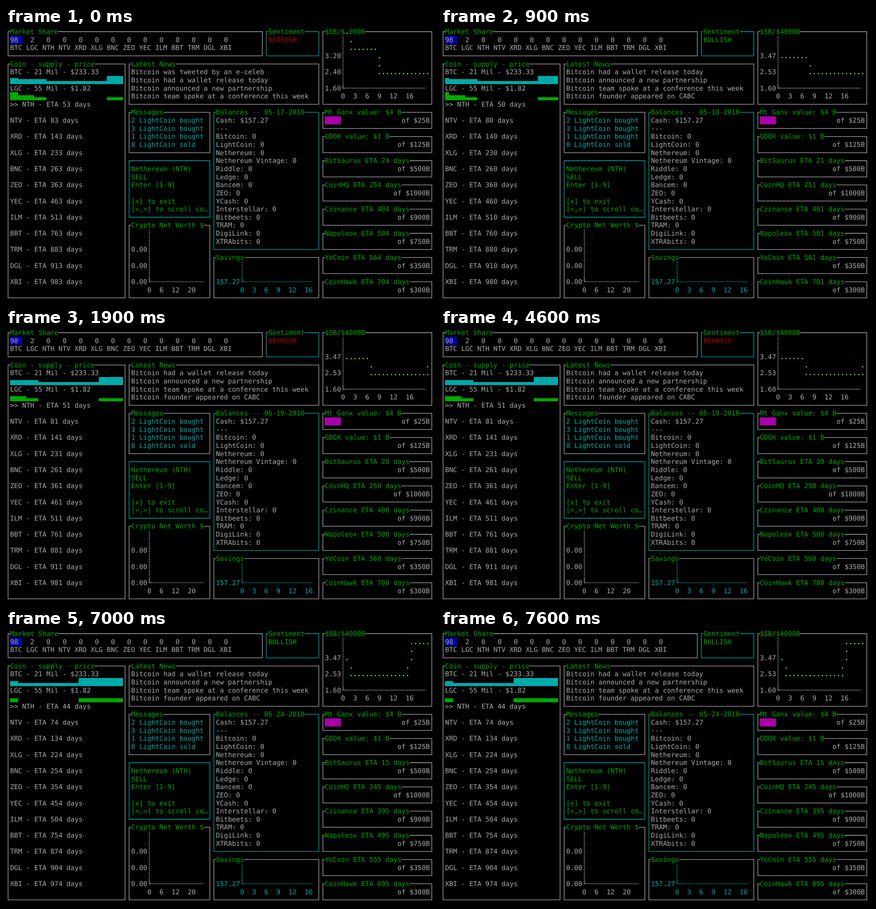
Recreate the animation shown at these times as an HTML page. Size 938 by 597 pixels, loop 8 s.

```html
<!DOCTYPE html>
<html lang="en">
<head>
<meta charset="utf-8">
<title>Coin terminal</title>
<style>
html, body { margin: 0; width: 100%; height: 100%; overflow: hidden; background: #000; }
svg { display: block; width: 938px; height: 597px; }
text {
  font: 14.656px "DejaVu Sans Mono", monospace;
  white-space: pre;
  text-rendering: geometricPrecision;
}
path { fill: none; stroke-width: 1.3; }
</style>
</head>
<body>
<svg id="screen" viewBox="0 0 938 597"></svg>
<script>
const CW = 8.824, RH = 17.64;
const GRAY = '#aaaaaa', GREEN = '#00aa00', CYAN = '#00aaaa', RED = '#aa0000',
  BLUE = '#0000aa', MAGENTA = '#aa00aa', LIME = '#55ff55';

const STEPS = [
  { at: 0, shift: 0, coinEta: 53, marketEta: 24, mood: 'BEARISH-' },
  { at: 900, shift: 1, coinEta: 50, marketEta: 21, mood: 'BULLISH' },
  { at: 1900, shift: 2, coinEta: 51, marketEta: 20, mood: 'BEARISH' },
  { at: 6400, shift: 6, coinEta: 47, marketEta: 16, mood: 'BULLISH' },
  { at: 7000, shift: 7, coinEta: 44, marketEta: 15, mood: 'BULLISH' }
];
const LOOP = 8000;

const COINS = 'BTC LGC NTH NTV XRD XLG BNC ZEO YEC ILM BBT TRM DGL XBI'.split(' ');
const COIN_DELAY = [0, 30, 90, 180, 210, 310, 410, 460, 710, 830, 860, 930];
const NEWS = [
  'Bitcoin was tweeted by an e-celeb',
  'Bitcoin had a wallet release today',
  'Bitcoin announced a new partnership',
  'Bitcoin team spoke at a conference this week',
  'Bitcoin founder appeared on CABC'
];
const MESSAGES = ['2 LightCoin bought', '3 LightCoin bought', '1 LightCoin bought', '8 LightCoin sold'];
const ACTIONS = ['Nethereum (NTH)', 'SELL', 'Enter [1-9]', '', '[x] to exit', '[<,>] to scroll co…'];
const HOLDINGS = ['Bitcoin', 'LightCoin', 'Nethereum', 'Nethereum Vintage', 'Riddle', 'Ledge', 'Bancem',
  'ZEO', 'YCash', 'Interstellar', 'Bitbeets', 'TRAM', 'DigiLink', 'XTRAbits'];
// name, value label or extra days, capacity
const MARKETS = [
  ['Mt Ganx', 'value: $4 B', '$25B'], ['GDOX', 'value: $1 B', '$125B'],
  ['BitSaurus', 0, '$500B'], ['CoinHQ', 230, '$1000B'], ['Czinance', 380, '$900B'],
  ['Napoleox', 480, '$750B'], ['YoCoin', 540, '$350B'], ['CoinHawk', 680, '$300B']
];

const left = c => 0.1 + c * CW;
const midX = c => left(c + 0.5);
const top_ = r => -0.8 + r * RH;
const midY = r => top_(r + 0.5);
const esc = s => s.replace(/&/g, '&amp;').replace(/</g, '&lt;').replace(/>/g, '&gt;');

const text = (c, r, s, color = GRAY, extra = '') =>
  `<text x="${left(c).toFixed(2)}" y="${(midY(r) + 5.05).toFixed(2)}" fill="${color}" ${extra}>${esc(s)}</text>`;

const lines = (c, r, list, color) => list.map((s, i) => text(c, r + i, s, color)).join('');

const fill = (c, r, w, color) =>
  `<rect x="${left(c)}" y="${top_(r)}" width="${w * CW}" height="${RH}" fill="${color}"/>`;

function box(c0, r0, c1, r1, title = '', color = GRAY) {
  const x0 = midX(c0), y0 = midY(r0), x1 = midX(c1), y1 = midY(r1);
  const a = left(c0 + 1), b = left(c0 + 1 + title.length);
  return `<path d="M${b} ${y0}H${x1}V${y1}H${x0}V${y0}H${a}" stroke="${color}"/>` +
    text(c0 + 1, r0, title, GREEN);
}

function axes(c, r0, r1, cEnd, color) {
  const x = midX(c), y = midY(r1);
  return `<path d="M${x} ${top_(r0) + 0.7}V${top_(r1)}" stroke="${color}" stroke-dasharray="2.9 1.51"/>` +
    `<path d="M${x} ${top_(r1)}V${y}H${left(c + 1)}" stroke="${color}"/>` +
    `<path d="M${left(c + 1) + 0.4} ${y}H${left(cEnd + 1)}" stroke="${color}" stroke-dasharray="1.4 .806"/>`;
}

const ticks = (c, r, list, color) => list.map(([dc, s]) => text(c + dc, r, s, color)).join('');

// 28 bars, heights in eighths of a row
function spark(r, shift, height, color) {
  let d = '';
  for (let i = 0; i < 28; i++) {
    const h = height(i + shift) / 8 * RH;
    if (h) d += `M${left(1 + i)} ${top_(r + 1)}v${-h}h${CW}v${h}z`;
  }
  return `<path d="${d}" style="fill:${color}"/>`;
}

const btcBar = i => i < 2 ? 6 : i < 9 ? 5 : i < 24 ? 3 : 8;
const lgcBar = shift => i => {
  const low = shift < 6 ? 3 : 4;
  return i < 2 ? 8 : i < 6 ? 5 : i < 9 ? low : i < 24 ? 0 : low;
};

function plot(shift) {
  const level = g => g < 1 ? 0 : g < 8 ? (shift ? 3 : 2) : g < 23 ? 5 : 1;
  let out = '';
  for (let i = 0; i < 21; i++) {
    const g = i + shift, row = level(g);
    const prev = i ? level(g - 1) : row, next = level(g + 1);
    const from = prev < row ? prev + 1 : next < row ? row - 1 : row;
    const to = prev > row ? prev - 2 : row;
    for (let r = from; r <= to; r++) out += text(84 + i, r, '.', LIME, 'font-weight="bold" style="font-weight:bold"');
  }
  return out;
}

function marketShare() {
  let out = box(0, 0, 63, 3, 'Market Share') + fill(1, 1, 3, BLUE) + text(1, 1, '98') + text(6, 1, '2');
  for (let i = 2; i < 14; i++) out += text(2 + 4 * i, 1, '0');
  return out + text(1, 2, COINS.join(' '));
}

function coinList(s) {
  return box(0, 4, 29, 33, 'Coin - supply - price') +
    text(1, 5, 'BTC - 21 Mil - $233.33') + spark(6, s.shift, btcBar, CYAN) +
    text(1, 7, 'LGC - 55 Mil - $1.82') + spark(8, s.shift, lgcBar(s.shift), GREEN) +
    COIN_DELAY.map((d, i) =>
      text(1, 9 + 2 * i, `${i ? '' : '>> '}${COINS[i + 2]} - ETA ${s.coinEta + d} days`)).join('');
}

function priceChart(s) {
  const labels = s.shift ? ['3.47', '2.53', '1.60'] : ['3.20', '2.40', '1.60'];
  return box(78, 0, 105, 9, s.shift ? '$5B/$4000B' : '$5B/$ 000B') +
    labels.map((v, i) => text(79, 3 + 2 * i, v)).join('') +
    axes(83, 1, 7, 103, GRAY) +
    ticks(83, 8, [[0, '0'], [3, '3'], [6, '6'], [9, '9'], [12, '12'], [16, '16']], GRAY) +
    plot(s.shift);
}

function markets(s) {
  return fill(79, 11, 4, MAGENTA) + MARKETS.map(([name, info, cap], i) => {
    const r = 10 + 3 * i, size = 'of ' + cap;
    const label = typeof info === 'number' ? `ETA ${s.marketEta + info} days` : info;
    return box(78, r, 105, r + 2, `${name} ${label}`) + text(105 - size.length, r + 1, size);
  }).join('');
}

function draw(s) {
  return '<rect width="938" height="597" fill="#000"/>' +
    marketShare() + coinList(s) + priceChart(s) + markets(s) +
    box(64, 0, 77, 3, 'Sentiment', CYAN) + text(65, 1, s.mood, s.mood[1] === 'E' ? RED : GREEN) +
    box(30, 4, 77, 9, 'Latest News') + lines(31, 5, NEWS.slice(s.shift ? 1 : 0).slice(0, 4)) +
    box(30, 10, 50, 15, 'Messages') + lines(31, 11, MESSAGES, CYAN) +
    box(30, 16, 50, 23, '', CYAN) + lines(31, 17, ACTIONS, GREEN) +
    box(51, 10, 77, 27, `Balances -- 05-${17 + s.shift}-2010`, CYAN) +
    lines(52, 11, ['Cash: $157.27', '---', ...HOLDINGS.map(h => h + ': 0')]) +
    box(30, 24, 50, 33, 'Crypto Net Worth $') +
    [27, 29, 31].map(r => text(31, r, '0.00')).join('') + axes(35, 25, 31, 48, GRAY) +
    ticks(35, 32, [[0, '0'], [3, '6'], [6, '12'], [10, '20']], GRAY) +
    box(51, 28, 77, 33, 'Savings') + text(52, 31, '157.27', CYAN) + axes(58, 29, 31, 75, CYAN) +
    ticks(58, 32, [[0, '0'], [3, '3'], [6, '6'], [9, '9'], [12, '12'], [16, '16']], CYAN);
}

const screen_ = document.getElementById('screen');
let shown = null;

function update(now) {
  const t = now % LOOP;
  const step = STEPS.filter(s => s.at <= t).pop();
  if (step !== shown) {
    screen_.innerHTML = draw(step);
    shown = step;
  }
}

const start = performance.now();
function tick() {
  update(performance.now() - start);
  requestAnimationFrame(tick);
}
tick();
</script>
</body>
</html>
```
